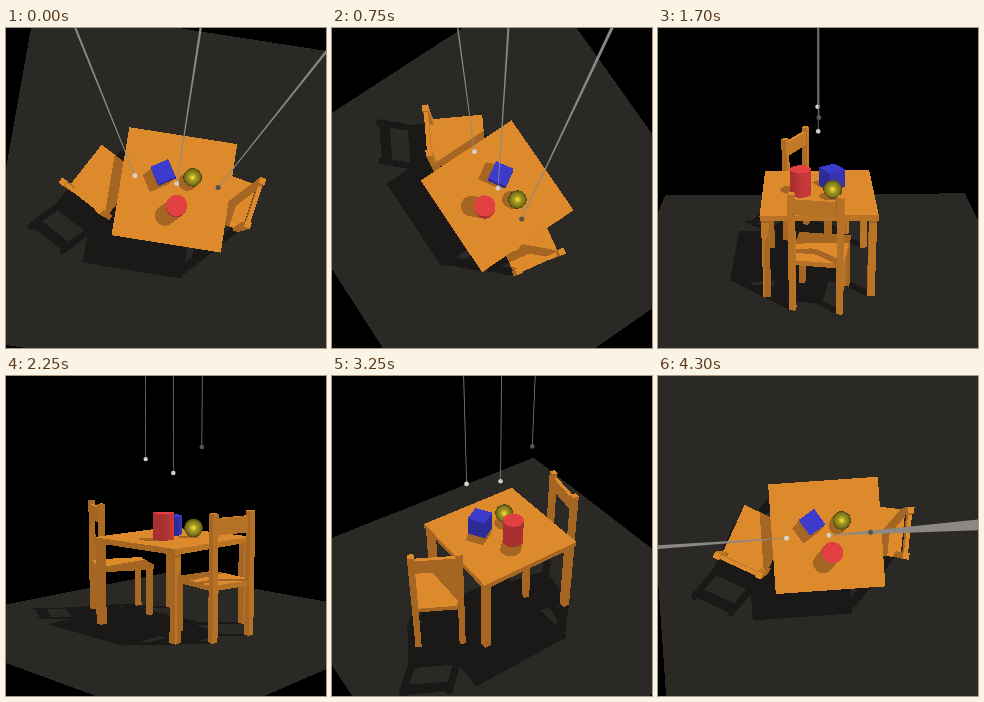
An HTML page with a canvas for the animation above (4350 ms loop, 320 by 320 pixels).

```html
<!DOCTYPE html>
<html lang="en">
<head>
<meta charset="utf-8">
<title>Table and chairs</title>
<style>
html, body { margin: 0; width: 100%; height: 100%; overflow: hidden; background: #000; }
canvas { display: block; width: 100vw; height: 100vh; }
</style>
</head>
<body>
<canvas id="stage" width="320" height="320"></canvas>
<script>
const SIZE = 320, HALF = SIZE / 2, STEP = 50, STEPS = 87;
const FOCAL = 742, DIST = 13.5, FLOOR_Z = -1.6, FLOOR_HALF = 3.47, CENTER_X = 0.16;
const ctx = document.getElementById('stage').getContext('2d');
const image = ctx.createImageData(SIZE, SIZE);
const pixels = image.data;

// Camera keys: time, azimuth, elevation (degrees)
const keys = [
  [0, 9, 85], [750, 56, 82.8], [1700, 89, 23.5], [2250, 43.5, 8],
  [2650, 6, 6], [3250, -34.5, 40], [4300, -4, 90]
];

function slopeAt(i, k) {
  const rate = j => (keys[j + 1][k] - keys[j][k]) / (keys[j + 1][0] - keys[j][0]);
  const last = keys.length - 1;
  if (i === 0) return 2 * rate(0) - slopeAt(1, k);
  if (i === last) return 2 * rate(last - 1) - slopeAt(last - 1, k);
  const before = keys[i][0] - keys[i - 1][0], after = keys[i + 1][0] - keys[i][0];
  return (rate(i - 1) * after + rate(i) * before) / (before + after);
}

function cameraAngle(t, k) {
  let i = 0;
  while (i < keys.length - 2 && t >= keys[i + 1][0]) i++;
  const a = keys[i], b = keys[i + 1], span = b[0] - a[0], u = (t - a[0]) / span;
  const u2 = u * u, u3 = u2 * u;
  const value = a[k] * (2 * u3 - 3 * u2 + 1) + b[k] * (3 * u2 - 2 * u3)
    + span * (slopeAt(i, k) * (u3 - 2 * u2 + u) + slopeAt(i + 1, k) * (u3 - u2));
  return value * Math.PI / 180;
}

// Boxes are [x0, y0, z0, x1, y1, z1] in the local frame of their group
const mirrored = b => [b, [b[0], -b[4], b[2], b[3], -b[1], b[5]]];
const tableBoxes = [
  [-1, -1, -0.1, 1, 1, 0],
  ...mirrored([-0.98, 0.85, FLOOR_Z, -0.85, 0.98, -0.1]),
  ...mirrored([0.85, 0.85, FLOOR_Z, 0.98, 0.98, -0.1])
];
const chairBoxes = [
  [0.02, -0.46, -0.72, 1.06, 0.46, -0.63],
  ...mirrored([0, 0.35, FLOOR_Z, 0.11, 0.46, 0.56]),
  ...mirrored([0.93, 0.35, FLOOR_Z, 1.04, 0.46, -0.72]),
  [0.02, -0.35, 0.2, 0.09, 0.35, 0.48]
];

function group(x, y, degrees, color, boxes) {
  const a = degrees * Math.PI / 180;
  const bound = boxes[0].map((_, i) => (i < 3 ? Math.min : Math.max)(...boxes.map(b => b[i])));
  return { x, y, cos: Math.cos(a), sin: Math.sin(a), color, boxes, bound };
}

const WOOD = [224, 140, 46];
const groups = [
  group(CENTER_X, 0, 0, WOOD, tableBoxes),
  group(1.635, 0.07, 190, WOOD, chairBoxes),
  group(-1.46, 0.465, -61.3, WOOD, chairBoxes),
  group(-0.09, -0.25, -32, [62, 60, 206], [[-0.17, -0.17, 0, 0.17, 0.17, 0.35]])
];
const ball = { x: 0.445, y: -0.25, z: 0.165, r: 0.165, color: [208, 192, 44] };
const can = { x: 0.24, y: 0.315, h: 0.47, r: 0.185, color: [230, 66, 66] };
const floor = { color: [44, 42, 39] };
const lamps = [
  { x: -0.515, z: 1.38, color: '#d8d6d4' },
  { x: 0.18, z: 1.15, color: '#d0cecc' },
  { x: 0.845, z: 1.62, color: '#555452' }
];
const LX = 0.333, LY = -0.341, LZ = 0.879;   // direction towards the light

let hitAxis = 0;
const hit = { t: 0, thing: null, x: 0, y: 0, z: 0 };

function slab(b, ox, oy, oz, ix, iy, iz) {
  let a = (b[0] - ox) * ix, c = (b[3] - ox) * ix;
  let near = Math.min(a, c), far = Math.max(a, c), axis = 0;
  a = (b[1] - oy) * iy; c = (b[4] - oy) * iy;
  let lo = Math.min(a, c);
  if (lo > near) { near = lo; axis = 1; }
  far = Math.min(far, Math.max(a, c));
  a = (b[2] - oz) * iz; c = (b[5] - oz) * iz;
  lo = Math.min(a, c);
  if (lo > near) { near = lo; axis = 2; }
  far = Math.min(far, Math.max(a, c));
  if (far < near || far < 0) return Infinity;
  hitAxis = axis;
  return near;
}

function record(t, thing, x, y, z) {
  hit.t = t; hit.thing = thing; hit.x = x; hit.y = y; hit.z = z;
}

// Fills `hit` with the nearest surface; for shadows any surface will do
function trace(ox, oy, oz, dx, dy, dz, shadow) {
  hit.t = Infinity;
  hit.thing = null;
  const iz = 1 / dz;
  for (const g of groups) {
    const px = ox - g.x, py = oy - g.y;
    const lx = px * g.cos + py * g.sin, ly = py * g.cos - px * g.sin;
    const ex = dx * g.cos + dy * g.sin, ey = dy * g.cos - dx * g.sin;
    const ix = 1 / ex, iy = 1 / ey;
    if (slab(g.bound, lx, ly, oz, ix, iy, iz) >= hit.t) continue;
    for (const b of g.boxes) {
      const t = slab(b, lx, ly, oz, ix, iy, iz);
      if (t >= hit.t || t < 0) continue;
      if (shadow) return true;
      if (hitAxis === 2) record(t, g, 0, 0, -Math.sign(dz));
      else if (hitAxis === 0) record(t, g, -Math.sign(ex) * g.cos, -Math.sign(ex) * g.sin, 0);
      else record(t, g, Math.sign(ey) * g.sin, -Math.sign(ey) * g.cos, 0);
    }
  }

  let px = ox - ball.x, py = oy - ball.y;
  const pz = oz - ball.z, dd = dx * dx + dy * dy + dz * dz;
  let b = px * dx + py * dy + pz * dz;
  let q = b * b - dd * (px * px + py * py + pz * pz - ball.r * ball.r);
  if (q > 0) {
    const t = (-b - Math.sqrt(q)) / dd;
    if (t > 0 && t < hit.t) {
      if (shadow) return true;
      record(t, ball, (px + t * dx) / ball.r, (py + t * dy) / ball.r, (pz + t * dz) / ball.r);
    }
  }

  px = ox - can.x; py = oy - can.y;
  const flat = dx * dx + dy * dy;
  b = px * dx + py * dy;
  q = b * b - flat * (px * px + py * py - can.r * can.r);
  if (q > 0) {
    const t = (-b - Math.sqrt(q)) / flat, z = oz + t * dz;
    if (t > 0 && t < hit.t && z > 0 && z < can.h) {
      if (shadow) return true;
      record(t, can, (px + t * dx) / can.r, (py + t * dy) / can.r, 0);
    }
  }
  const cap = (can.h - oz) * iz;
  if (cap > 0 && cap < hit.t && Math.hypot(px + cap * dx, py + cap * dy) < can.r) {
    if (shadow) return true;
    record(cap, can, 0, 0, 1);
  }
  if (shadow) return false;

  const t = (FLOOR_Z - oz) * iz;
  if (t > 0 && t < hit.t && Math.abs(ox + t * dx - CENTER_X) < FLOOR_HALF
      && Math.abs(oy + t * dy) < FLOOR_HALF) record(t, floor, 0, 0, 1);
  return hit.thing !== null;
}

function brightness(ox, oy, oz, dx, dy, dz) {
  const { t, thing, x, y, z } = hit;
  if (thing === ball) {
    const view = -(x * dx + y * dy + z * dz);
    return 0.25 + 0.55 * view + 0.35 * Math.max(0, view) ** 24;
  }
  const facing = x * LX + y * LY + z * LZ, e = 0.002;
  let light = 0.73;
  if (facing > 0
      && !trace(ox + t * dx + x * e, oy + t * dy + y * e, oz + t * dz + z * e, LX, LY, LZ, true)) {
    light += 0.29 * facing;
  }
  return thing === floor ? light ** 1.6 : light;
}

function drawLamps(project) {
  for (const lamp of lamps) {
    const p = project(lamp.x, lamp.z);
    const top = project(lamp.x, Math.min(60, lamp.z + (p.depth - 0.5) / p.sinE));
    const len = Math.hypot(top.x - p.x, top.y - p.y) || 1;
    const nx = (top.y - p.y) / len, ny = (p.x - top.x) / len;
    const w0 = 0.006 * p.scale, w1 = 0.006 * top.scale;
    ctx.fillStyle = '#8c8985';
    ctx.beginPath();
    ctx.moveTo(p.x + nx * w0, p.y + ny * w0);
    ctx.lineTo(top.x + nx * w1, top.y + ny * w1);
    ctx.lineTo(top.x - nx * w1, top.y - ny * w1);
    ctx.lineTo(p.x - nx * w0, p.y - ny * w0);
    ctx.fill();
    ctx.fillStyle = lamp.color;
    ctx.beginPath();
    ctx.arc(p.x, p.y, 0.04 * p.scale, 0, 2 * Math.PI);
    ctx.fill();
  }
}

function draw(time) {
  const az = cameraAngle(time, 1), el = cameraAngle(time, 2);
  const ca = Math.cos(az), sa = Math.sin(az), ce = Math.cos(el), se = Math.sin(el);
  const nx = ce * sa, ny = ce * ca, nz = se;
  const ox = nx * DIST, oy = ny * DIST, oz = nz * DIST;
  let i = 0;
  for (let row = 0; row < SIZE; row++) {
    const v = (HALF - row - 0.5) / FOCAL;
    for (let col = 0; col < SIZE; col++, i += 4) {
      const u = (col + 0.5 - HALF) / FOCAL;
      const dx = u * ca - v * se * sa - nx, dy = -u * sa - v * se * ca - ny, dz = v * ce - nz;
      let color = floor.color, k = 0;
      if (trace(ox, oy, oz, dx, dy, dz, false)) {
        color = hit.thing.color;
        k = brightness(ox, oy, oz, dx, dy, dz);
      }
      pixels[i] = color[0] * k;
      pixels[i + 1] = color[1] * k;
      pixels[i + 2] = color[2] * k;
      pixels[i + 3] = 255;
    }
  }
  ctx.putImageData(image, 0, 0);

  drawLamps((x, z) => {
    const depth = DIST - x * nx - z * nz, scale = FOCAL / depth;
    return {
      x: HALF + x * ca * scale,
      y: HALF - (z * ce - x * sa * se) * scale,
      depth, scale, sinE: se
    };
  });
}

const start = performance.now();
let shown = -1;
function tick() {
  const step = Math.floor((performance.now() - start) / STEP) % STEPS;
  if (step !== shown) {
    shown = step;
    draw(step * STEP);
  }
  requestAnimationFrame(tick);
}
tick();
</script>
</body>
</html>
```
